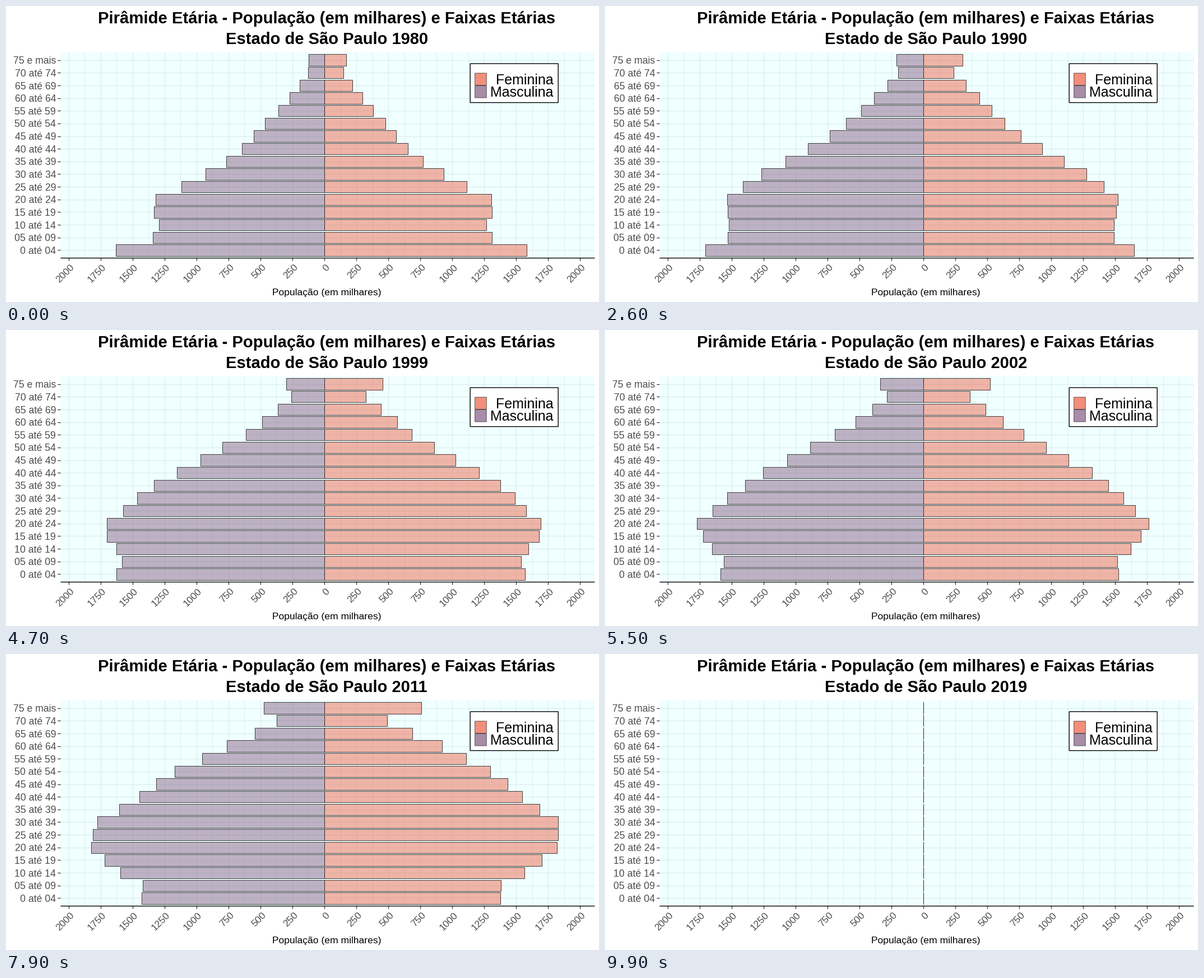
These frames come from a looping animation (1058x529 px, 10 s). A matplotlib script:

```python
import numpy as np
import matplotlib.pyplot as plt
from matplotlib.animation import FuncAnimation
from matplotlib.patches import Rectangle

W, H, DPI = 1058, 529, 100
FRAMES, INTERVAL = 100, 100
LEFT, RIGHT, TOP, BOTTOM = 96.5, 1050, 83, 450
ZERO, SCALE = 568.0, 0.2281          # pixel of zero, pixels per thousand
STEP = (BOTTOM - TOP) / 16.2
GROUPS = np.arange(16)               # five-year age groups, youngest first
ROWS = BOTTOM - STEP * (0.6 + GROUPS)
BAR = 0.9 * STEP
FEM, MASC = "#EE6A50", "#8B668B"
GRID, TICK, LABEL, EDGE = "#DCEFEE", "#333333", "#4D4D4D", "#262626"

# Cohort model: size by birth year, share present by age group in 1980 and 2015.
BORN = [*range(1900, 2001, 10), 2006, 2013]
SIZE = [210, 320, 448, 590, 740, 1040, 1362, 1550, 1785, 1850, 1730, 1540, 1690]
KEYS = [0, 1, 2, 4, 6, 8, 10, 12, 14, 15]
SHARE_1980 = [.945, .835, .86, 1.03, .965, .915, .84, .655, .44, .52]
SHARE_2015 = [.89, .885, .92, .985, 1.02, .955, .895, .775, .53, .76]
# Women per man at a few age groups.
RATIO_KEYS = [0, 5, 10, 14, 15]
RATIO_1980 = [.97, .995, 1.025, 1.17, 1.40]
RATIO_2015 = [.96, 1.01, 1.12, 1.33, 1.63]


def between(u, keys, first, last):
    """Age curve blended from its first to its last shape."""
    return (1 - u) * np.interp(GROUPS, keys, first) + u * np.interp(GROUPS, keys, last)


def population(year):
    u = (year - 1980) / 35
    cohort = np.interp(year - 2.5 - 5 * GROUPS, BORN, SIZE)
    men = cohort * between(u, KEYS, SHARE_1980, SHARE_2015)
    return men, men * between(u, RATIO_KEYS, RATIO_1980, RATIO_2015)


def px(size):
    return size * 72 / DPI


fig = plt.figure(figsize=(W / DPI, H / DPI), dpi=DPI, facecolor="white")
ax = fig.add_axes([0, 0, 1, 1])
ax.set_xlim(0, W)
ax.set_ylim(H, 0)
ax.axis("off")


def line(x0, y0, x1, y1, color, width, z=1):
    ax.plot([x0, x1], [y0, y1], color=color, lw=px(width), zorder=z,
            solid_capstyle="butt")


def text(x, y, s, size, color="black", ha="right", **kw):
    return ax.text(x, y, s, fontsize=px(size), color=color, ha=ha,
                   va="baseline", family="Liberation Sans", zorder=6, **kw)


def box(x, y, w, h, fill, edge="none", width=0.0, z=0, **kw):
    return ax.add_patch(Rectangle((x, y), w, h, facecolor=fill, edgecolor=edge,
                                  lw=px(width), zorder=z, joinstyle="miter", **kw))


def bars(color):
    return [box(ZERO, y - BAR / 2, 0, BAR, (color, 0.5), EDGE, 0.85, 3)
            for y in ROWS]


# Panel, grid and axes
box(LEFT, TOP, RIGHT - LEFT, BOTTOM - TOP, "#F0FFFF")
for v in range(-2000, 2125, 125):
    x = ZERO + v * SCALE
    major = v % 250 == 0
    line(x, TOP, x, BOTTOM, GRID, 1.4 if major else 1.0)
    if major:
        line(x, BOTTOM, x, BOTTOM + 4.5, TICK, 1.3)
        text(x + 10.5, 467.9, str(abs(v)), 17.5, LABEL, rotation=45,
             rotation_mode="anchor")
names = ["0 até 04", "05 até 09"]
names += [f"{a} até {a + 4}" for a in range(10, 75, 5)] + ["75 e mais"]
for y, name in zip(ROWS, names):
    line(LEFT, y, RIGHT, y, GRID, 1.4)
    line(LEFT - 4.5, y, LEFT, y, TICK, 1.3)
    text(89, y + 6.6, name, 17.6, LABEL)
line(LEFT, BOTTOM, RIGHT, BOTTOM, "black", 1.4, 5)
text(572.3, 517.3, "População (em milhares)", 17.45, ha="center")

# Titles
text(572.5, 31.2, "Pirâmide Etária - População (em milhares) e Faixas Etárias",
     29.2, ha="center", weight="bold")
title = text(572.2, 68.4, "", 29.1, ha="center", weight="bold")

# Legend
box(828.2, 103, 157, 69.6, "white", "black", 1.4, 4, snap=False)
for y, name, color in [(120, "Feminina", FEM), (142.5, "Masculina", MASC)]:
    box(836.7, y, 20.5, 21.5, (color, 0.75), EDGE, 0.7, 5, snap=False)
    text(976.8, y + 20, name, 25)

men_bars, women_bars = bars(MASC), bars(FEM)


def draw(i):
    year = 1980 + 39 * i / (FRAMES - 1)
    men, women = population(year)
    left = np.clip((FRAMES - 1 - i) / 3, 0, 1)   # the last year has no data
    for m, w, mb, wb in zip(men, women, men_bars, women_bars):
        mb.set_width(-SCALE * m * left)
        wb.set_width(SCALE * w * left)
    title.set_text(f"Estado de São Paulo {round(year)}")
    return [title, *men_bars, *women_bars]


anim = FuncAnimation(fig, draw, frames=FRAMES, interval=INTERVAL,
                     repeat=True, repeat_delay=0, blit=False)
plt.show()
```
